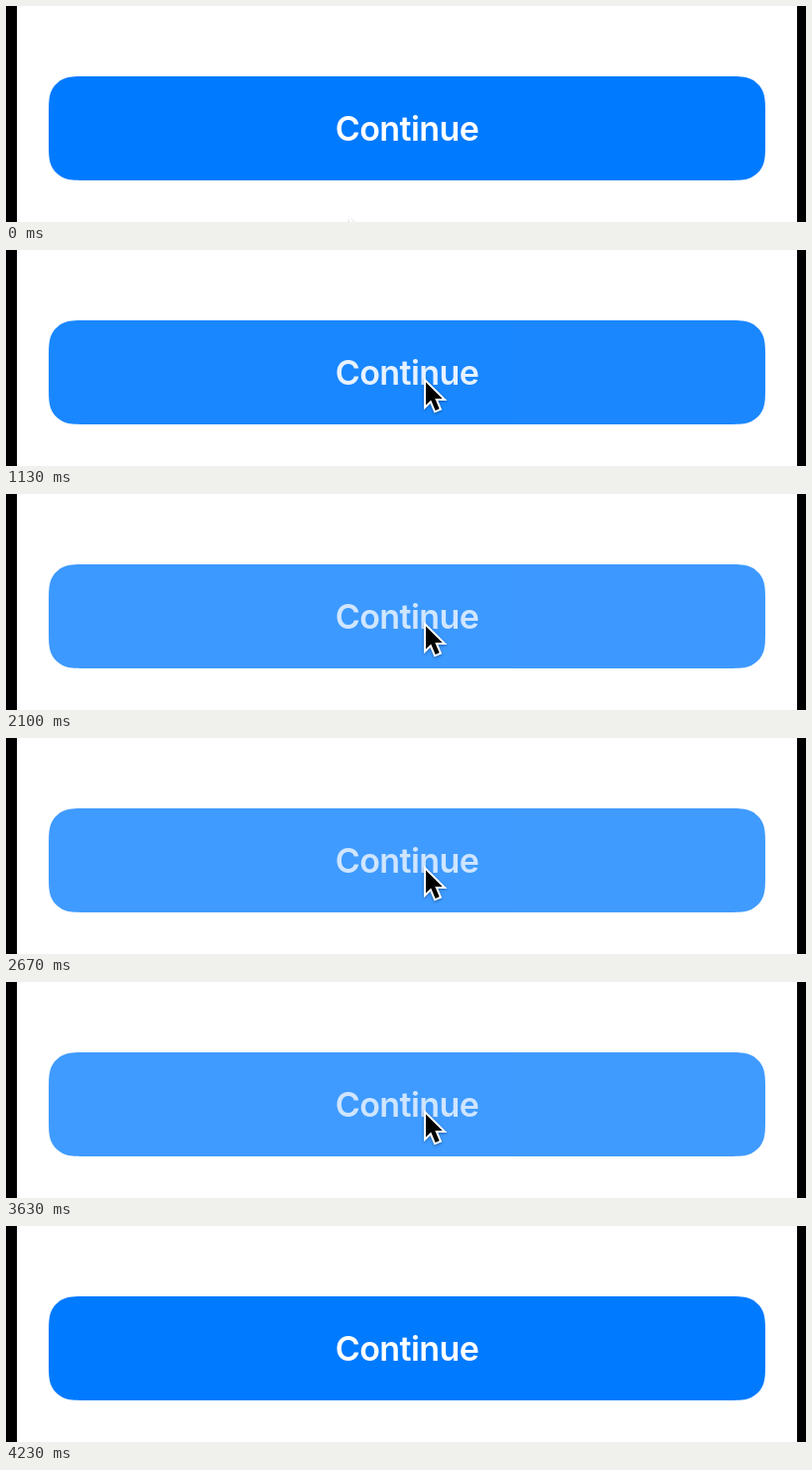
An HTML page that plays this animation: 806x218 px, repeating every 4900 ms.

```html
<!DOCTYPE html>
<html lang="en">
<head>
<meta charset="utf-8">
<title>Continue button</title>
<style>
  html, body { margin: 0; width: 100%; height: 100%; overflow: hidden; background: #000; }
  svg { display: block; width: 806px; height: 218px; }
  text {
    font: 600 34px Inter, "Liberation Sans", sans-serif;
    letter-spacing: -0.6px;
    text-anchor: middle;
    fill: #fff;
  }
  #cursor {
    stroke: #fff;
    stroke-width: 4;
    paint-order: stroke;
    filter: drop-shadow(0 1px 1.5px rgba(0, 0, 0, .35));
  }
</style>
</head>
<body>
<svg viewBox="0 0 806 218">
  <rect width="806" height="218"/>
  <rect x="11" width="786" height="218" fill="#fff"/>
  <g id="button">
    <path id="shape" fill="#007aff"/>
    <text id="label" x="404" y="136.3">Continue</text>
  </g>
  <path id="cursor" d="M0 0V23L5.2 18L9.6 28.4L13.6 26.7L9.3 16.6H16.6Z"/>
</svg>
<script>
const LOOP = 4900;
const FRAME = 100 / 3;
const REST = [423, 133.5];
const byId = id => document.getElementById(id);
const button = byId('button'), label = byId('label'), cursor = byId('cursor');

const progress = (t, from, to) => Math.min(1, Math.max(0, (t - from) / (to - from)));
const easeOut = u => 1 - (1 - u) ** 2;
const easeInOut = u => u * u * (3 - 2 * u);
const mix = (a, b, u) => a + (b - a) * u;

// Rounded box with continuous-curvature corners.
function smoothBox(left, top, right, bottom, radius) {
  const corner = [[1.5287, 0], [1.0885, 0], [.8684, 0], [.6315, .0749],
    [.3728, .1691], [.1691, .3728], [.0749, .6315], [0, .8684], [0, 1.0885], [0, 1.5287]];
  const trace = (flipX, flipY) => {
    const points = corner.map(([x, y]) => [
      flipX ? right - x * radius : left + x * radius,
      flipY ? bottom - y * radius : top + y * radius
    ].map(v => v.toFixed(2)).join(' '));
    if (flipX !== flipY) points.reverse();
    return `${points[0]}C${points.slice(1).join(' ')}`;
  };
  return `M${trace(false, false)}L${trace(false, true)}L${trace(true, true)}L${trace(true, false)}Z`;
}

const presses = [
  { shown: 1130, down: [1065, 1367], up: [2055, 2425] },
  { shown: 2630, down: [2600, 2667], up: [2995, 3366] },
  { shown: 3630, down: [3600, 3632], up: [3930, 4230] }
];

function pressAmount(t) {
  const press = presses.filter(p => t >= p.shown).pop();
  if (!press) return 0;
  return easeOut(progress(t, ...press.down)) * (1 - easeInOut(progress(t, ...press.up)));
}

function cursorAt(t) {
  if (t < 1130) {
    const u = easeOut(progress(t, 0, 100));
    return [mix(348, 363, u), mix(218.5, 198, u)];
  }
  const leaving = progress(t, 4050, 4225) ** 2;
  return [REST[0], mix(REST[1], -40, leaving)];
}

function draw(time) {
  const step = Math.floor((time % LOOP + 3.4) / FRAME);
  const t = step * FRAME;
  const fade = 1 - .25 * pressAmount(t);
  button.setAttribute('opacity', fade);
  label.setAttribute('opacity', fade);
  cursor.setAttribute('transform', `translate(${cursorAt(t)})`);
}

byId('shape').setAttribute('d', smoothBox(43, 71, 765, 176, 26));
const start = performance.now();
function tick() {
  draw(performance.now() - start);
  requestAnimationFrame(tick);
}
tick();
</script>
</body>
</html>
```
